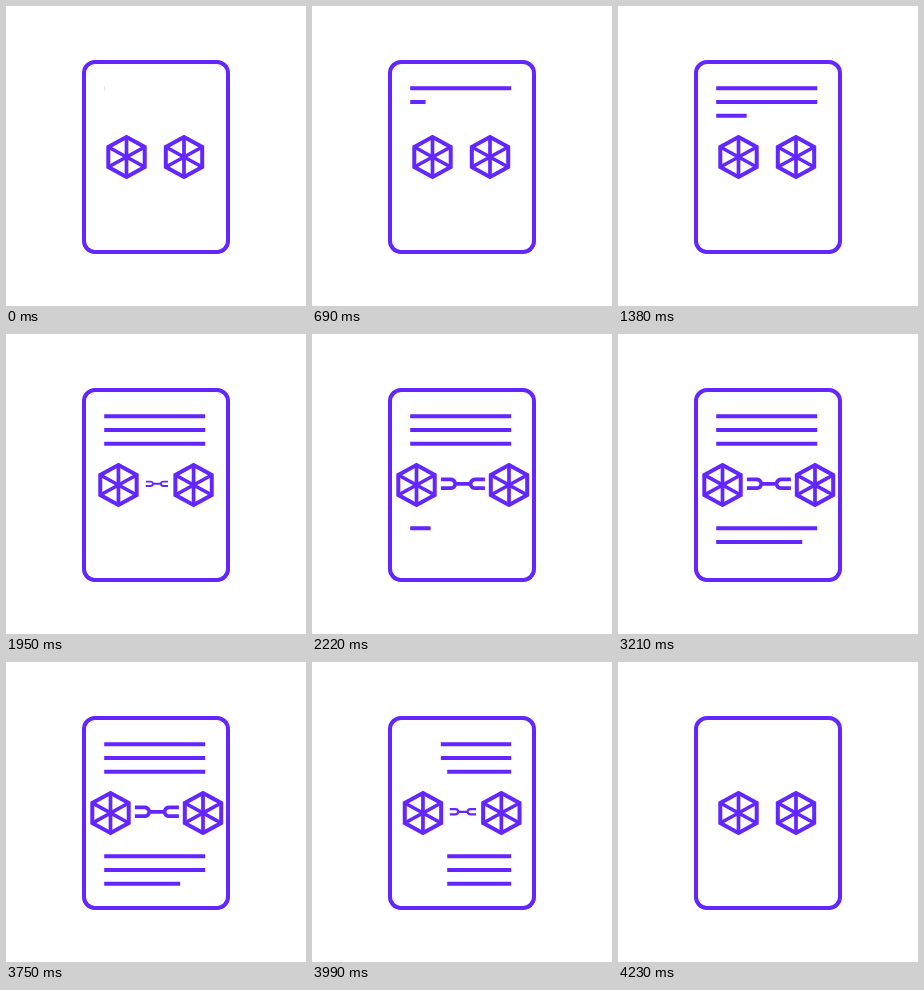
These frames come from a looping animation (300x300 px, 4.5 s). An HTML page:

```html
<!DOCTYPE html>
<html lang="en">
<head>
<meta charset="utf-8">
<title>Linked blocks</title>
<style>
html, body { margin: 0; width: 100%; height: 100%; overflow: hidden; background: #fff; }
svg { display: block; width: 100%; height: 100%; fill: none; stroke: #6326ff; stroke-width: 4; }
</style>
</head>
<body>
<svg viewBox="0 0 300 300">
  <defs>
    <g id="block">
      <path d="M0-20L18.2-10V10L0 20L-18.2 10V-10Z"/>
      <path stroke-width="3.7" d="M0-20V20M-18.2-10L18.2 10M-18.2 10L18.2-10"/>
    </g>
  </defs>
  <rect x="78" y="56" width="144" height="190" rx="11"/>
  <path id="text"/>
  <use id="left" href="#block"/>
  <use id="right" href="#block"/>
  <path id="chain" stroke-width="3.7" d="M-22-4.4H-12.5Q-8.5-4.4-7.5 0Q-8.5 4.4-12.5 4.4H-22M22-4.4H12.5Q8.5-4.4 7.5 0Q8.5 4.4 12.5 4.4H22M-7.5 0H7.5"/>
</svg>
<script>
const LOOP = 4500, X0 = 98.2, LENGTH = 101;
// y, start of drawing, start of erasing
const lines = [
  [82.2, 0, 3900], [96, 600, 3900], [109.8, 1200, 3870],
  [194.2, 2100, 3870], [208, 2700, 3870], [221.8, 3300, 3870]
];
const [text, left, right, chain] =
  ['text', 'left', 'right', 'chain'].map(id => document.getElementById(id));
const ramp = (t, from, to) => Math.min(1, Math.max(0, (t - from) / (to - from)));
const place = (el, x, y, scale = 1) =>
  el.setAttribute('transform', `translate(${x} ${y}) scale(${scale})`);

function draw(now) {
  const t = now % LOOP;
  text.setAttribute('d', lines.map(([y, start, erase]) => {
    const head = ramp(t, start, start + 600), tail = ramp(t, erase, 4200);
    return head > tail ? `M${X0 + LENGTH * tail} ${y}H${X0 + LENGTH * head}` : '';
  }).join(''));

  const open = ramp(t, 1800, 2100) - ramp(t, 3870, 4170);
  place(left, 120.5 - 16 * open, 151);
  place(right, 178 + 19 * open, 151);
  place(chain, 150.9, 149.8, open);
  chain.style.display = open > 0 ? '' : 'none';
}

const begin = performance.now();
function tick() {
  draw(performance.now() - begin);
  requestAnimationFrame(tick);
}
tick();
</script>
</body>
</html>
```
